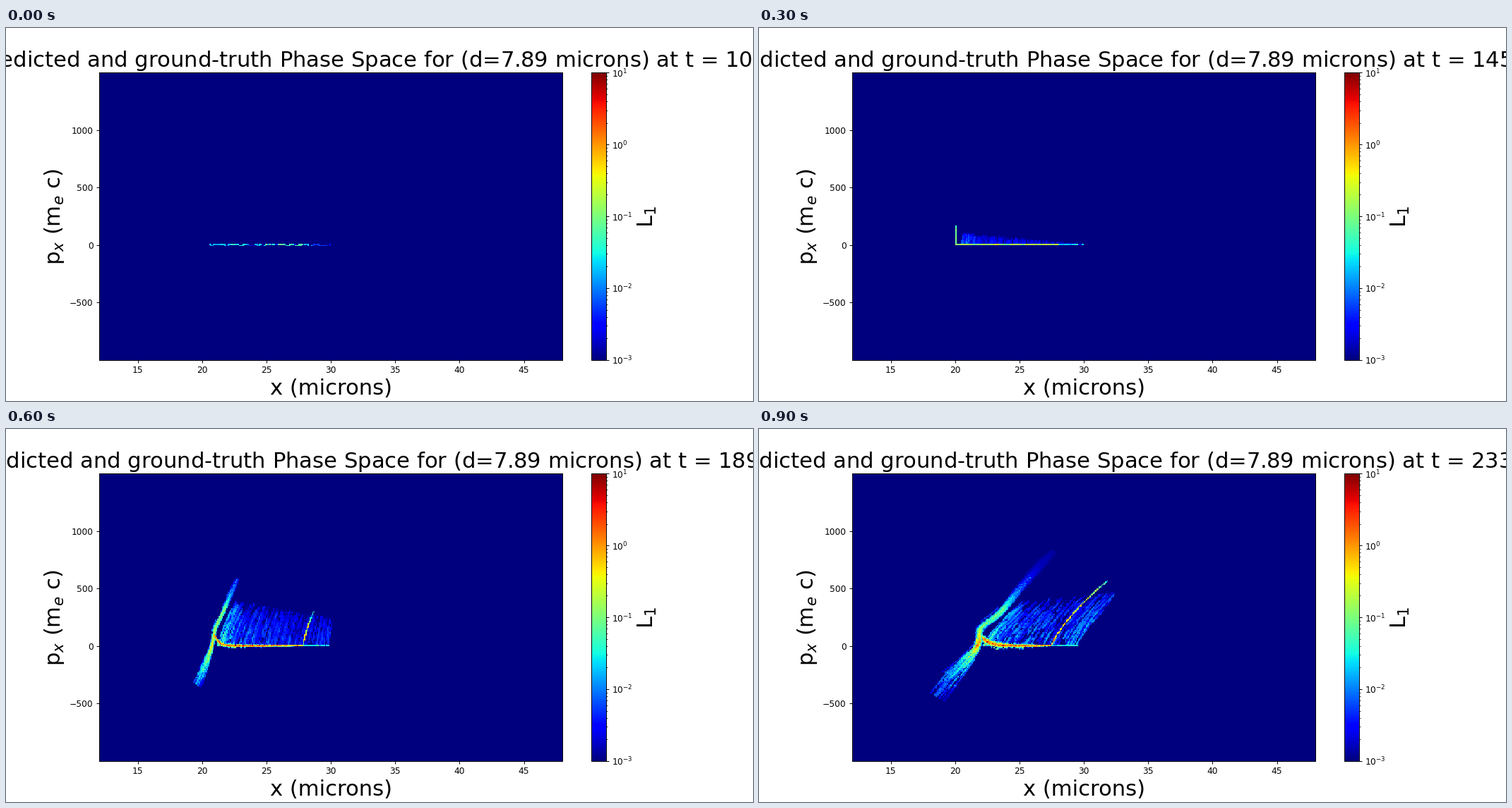
Animation, 1058 px wide and 529 px high, one loop 1 s. Source, as a matplotlib script:

```python
import numpy as np
import matplotlib.pyplot as plt
from matplotlib.animation import FuncAnimation
from matplotlib.colors import LogNorm

W, H, DPI = 1058, 529, 529 / 6
NX, NP = 400, 250
FRAMES = 10
DT = 102.1 / 7          # femtoseconds per step, the run starts at step 7
REST = 307.6            # screen height of zero momentum

rng = np.random.default_rng(7)
N_HAIR, N_HAZE, N_BAR = 170, 280, 1500

hair_mid = rng.uniform(0, 1, (N_HAIR, 1))
hair_len = rng.uniform(.05, .25, (N_HAIR, 1))
hair_off = rng.normal(size=(N_HAIR, 1))
hair_gain = rng.uniform(.35, 1, (N_HAIR, 1))

haze_pos = np.sort(rng.uniform(0, 1, (N_HAZE, 1)), axis=0)
haze_top = rng.uniform(.4, 1, (N_HAZE, 1)) ** .5
haze_gain = np.minimum(.25 + rng.exponential(.6, (N_HAZE, 1)), 1.8)


def smooth(a, n, axis):
    return np.apply_along_axis(np.convolve, axis, a, np.ones(n) / n ** .5, "same")


haze_gap = smooth(smooth(rng.normal(size=(N_HAZE, 80)), 13, 1), 4, 0)

bar_u = rng.uniform(0, 1, N_BAR)
bar_off = rng.normal(size=N_BAR)


def ease(k, first, blow, last):
    """Value at the first kick (3), the break-up (5) and the end (9)."""
    return np.interp(k, [3, 5, 9], [first, blow, last])


def late(k):
    return np.clip((k - 5) / 4, 0, 1)


def core(k):
    return ease(k, 279, 286, 310)


def front_base(k):
    return 423 - 9 * late(k)


def bar_ends(k):
    left = core(k) + ease(k, 0, 3, 6) if k >= 3 else 289
    return left, 460 - 8 * late(k)


def hook(k, x, left):
    """Height of the dense layer where it bends up into the spine."""
    rise = ease(k, 0, 15, 12)
    return REST - rise * np.exp((left - x) / ease(k, 3, 5, 11))


def put(grid, x, y, level):
    """Raise the cells under the given screen points to a level."""
    x, y, level = np.broadcast_arrays(x, y, level)
    col = np.floor((x - .125 * W) / (.62 * W) * NX).astype(int).ravel()
    row = np.floor((y - .12 * H) / (.77 * H) * NP).astype(int).ravel()
    ok = (col >= 0) & (col < NX) & (row >= 0) & (row < NP)
    np.maximum.at(grid, (row[ok], col[ok]), level.ravel()[ok])


def dashes(noise, n, rate):
    """Piecewise constant noise with runs of random length."""
    run = np.cumsum(noise.random(n) < rate)
    return noise.normal(size=run[-1] + 1)[run]


def draw_haze(grid, k):
    q = late(k)
    left, right = core(k) + 8, bar_ends(k)[1]
    h = np.linspace(0, 1, 80)
    height = ease(k, 16, 64, 62) * (1 - haze_pos) + 76 * q ** .5 * haze_pos
    drift = ease(k, 1, 14, 52) * (1 - haze_pos) + 57 * q ** 1.75 * haze_pos
    x = left + haze_pos * (right - left) + drift * h ** 1.3 * haze_top
    y = 307 - height * haze_top * h
    level = .07 + .16 * np.exp(-5 * haze_pos) + .08 * q * haze_pos
    level = level * haze_gain * ease(k, .6, 1, 1) * (1.15 - .5 * h)
    level = level + .025 * haze_gap
    cut = ease(k, -1, -.7, .1) - .5 * np.cos(2 * np.pi * haze_pos) * q
    put(grid, x, y, np.where((haze_gap > cut) & (height > 1), level, 0))


def spine_x(k, up):
    dent = 12 * late(k) * np.exp(-((up - 25) / 15) ** 2)
    tilt = ease(k, 0, .17, .64)
    bend = ease(k, 0, .0009, .0012)
    return core(k) + tilt * up + bend * up * np.abs(up) - dent


def draw_spine(grid, k, noise):
    top, bottom = ease(k, 26, 82, 134), ease(k, 0, -50, -74)
    u = np.clip(hair_mid + hair_len * np.linspace(-.5, .5, 70), 0, 1)
    up = bottom + u * (top - bottom)
    # The lower end fans out to the left.
    fan = np.clip(-up / 50, 0, 1)
    shift = ease(k, .2, 1, 3) * (1 + 1.6 * fan) * (hair_off + .9 * fan)
    level = .47 + .28 * np.exp(-((up - 5) / 14) ** 2) * ease(k, .2, .4, 1)
    level = level * np.exp(-np.maximum(up - 52, 0) / 32)
    level = level * np.exp(-np.maximum(-up - 20, 0) / 55)
    level = level * hair_gain * np.exp(-.16 * hair_off ** 2) * ease(k, .8, 1, 1)
    level = level + noise.normal(0, .05, u.shape) * (level > .1)
    put(grid, spine_x(k, up) - .8 * shift, REST - up - .5 * shift, level)


def draw_layer(grid, k, noise):
    left, right = bar_ends(k)
    base = front_base(k)
    x = np.linspace(left, right, 500)
    step = dashes(noise, x.size, .16)
    level = np.interp(k, [0, 1, 3, 5], [.29, .4, .54, .6])
    level = level + .12 * np.exp(-((x - 395) / 25) ** 2) * (k < 3)
    level = level + ease(k, 0, .14, .14) * np.clip((base - x) / 110, 0, 1)
    level = np.where(x < base, level, .6 * level)
    level = level + np.interp(k, [0, 1, 3], [.08, .08, .045]) * step
    level = np.where((step < -.8) & ((k < 2) | (x > base + 10)), .5 * level, level)
    hop = (dashes(noise, x.size, .1) > .4) & (k < 3)
    put(grid, x, hook(k, x, left) - .4 + .8 * hop, level)

    # Grains heat the layer, most of all next to the spine.
    x = left + bar_u * (base - left)
    width = ease(k, 0, 1.1, 3.2) * (1 - bar_u)
    y = hook(k, x, left) + width * bar_off
    level = .7 - .1 * bar_u - .18 * np.abs(bar_off) + noise.normal(0, .1, N_BAR)
    put(grid, x + .3 * width * bar_off, y, level * (width > .1))


def draw_front(grid, k, noise):
    h = np.linspace(0, 1, 140)
    up = h * np.interp(k, [4, 5, 7, 9], [0, 25, 68, 91])
    slope = .14 + .74 * late(k)
    x = front_base(k) + slope * up * (.6 + .4 * h)
    level = .5 + .16 * late(k) ** .5 - .25 * h ** 3
    put(grid, x, REST - 1 - up, level + .06 * dashes(noise, h.size, .2))


def density(k):
    noise = np.random.default_rng(40 + k)
    grid = np.zeros((NP, NX))
    if k >= 3:
        draw_haze(grid, k)
        draw_spine(grid, k, noise)
    draw_layer(grid, k, noise)
    if k >= 5:
        draw_front(grid, k, noise)
    return 10 ** (4 * np.clip(grid, 0, 1) - 3)


def caption(k):
    t = round((k + 7) * DT, 2)
    return ("L$_1$ between predicted and ground-truth Phase Space "
            f"for (d=7.89 microns) at t = {t} fs")


plt.rcParams["font.family"] = "DejaVu Sans"
fig, ax = plt.subplots(figsize=(12, 6), dpi=DPI)
image = ax.imshow(density(0), cmap="jet", norm=LogNorm(1e-3, 10), aspect="auto",
                  interpolation="nearest", extent=(12, 48, -1000, 1500))
ax.set_xticks(range(15, 50, 5))
ax.set_yticks(range(-500, 1001, 500))
ax.set_xlabel("x (microns)", size=25)
ax.set_ylabel("p$_x$ (m$_e$ c)", size=25)
title = ax.set_title(caption(0), size=25, x=.498)
bar = fig.colorbar(image, ax=ax)
bar.set_label("L$_1$", size=25)


def draw(k):
    image.set_data(density(k))
    title.set_text(caption(k))
    return image, title


anim = FuncAnimation(fig, draw, frames=FRAMES, interval=100, repeat=True)
plt.show()
```
